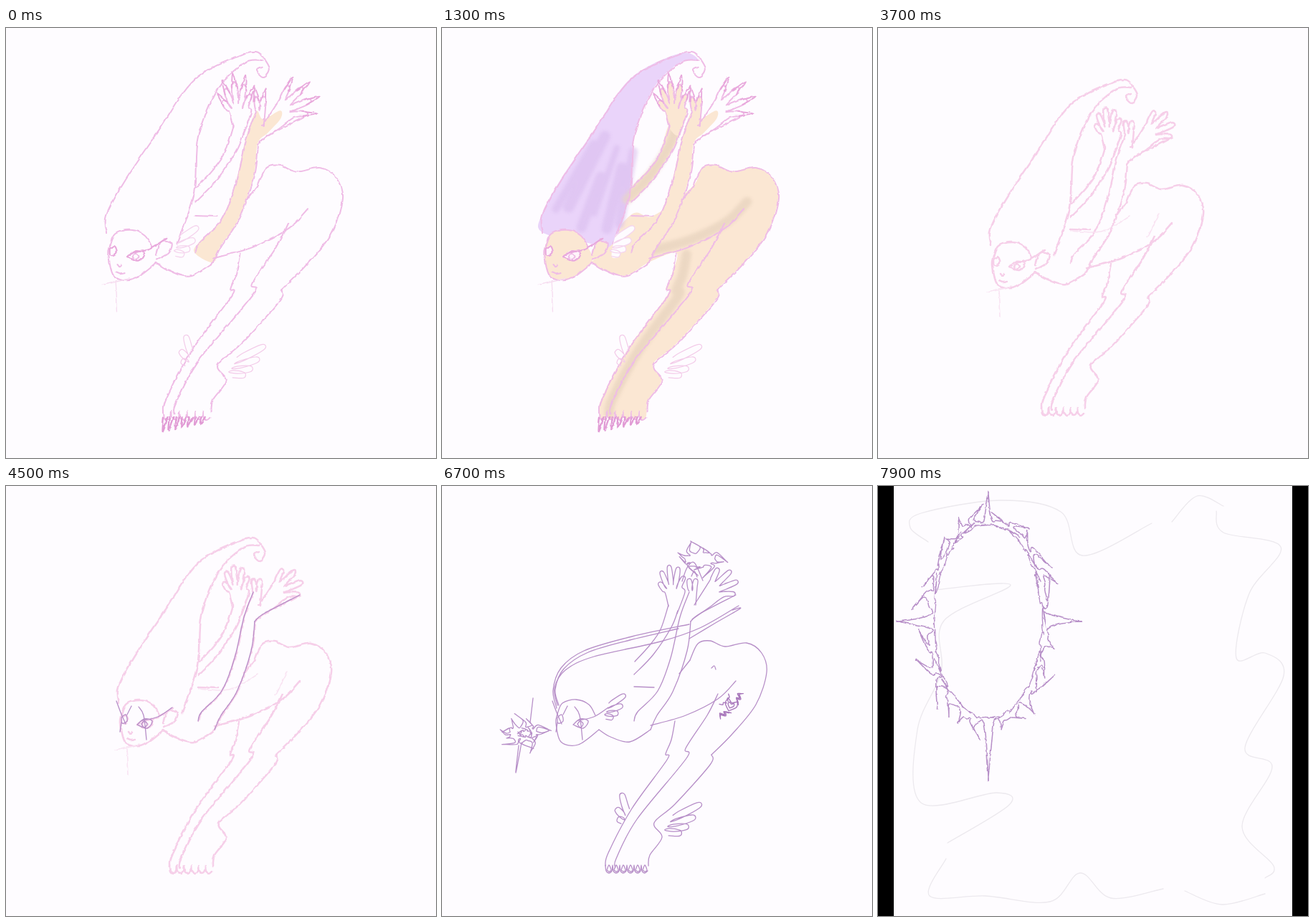
An HTML page that plays this animation: 600x600 px, repeating every 8000 ms.

```html
<!DOCTYPE html>
<html lang="en">
<head>
<meta charset="utf-8">
<title>Drawing timelapse</title>
<style>
html, body { margin: 0; width: 100%; height: 100%; overflow: hidden; background: #fefcff; }
svg { display: block; width: 100vw; height: 100vh; }
path { fill: none; stroke-linecap: round; stroke-linejoin: round; }
</style>
</head>
<body>
<svg id="stage" viewBox="0 0 600 600">
  <filter id="rough" color-interpolation-filters="sRGB">
    <feTurbulence baseFrequency=".09" numOctaves="2" seed="4"/>
    <feDisplacementMap in="SourceGraphic" scale="2" xChannelSelector="R" yChannelSelector="G"/>
  </filter>
  <filter id="soft"><feGaussianBlur stdDeviation="1.8"/></filter>
</svg>
<script>
const LOOP = 8000, STEP = 100;
const PEACH = '#fbe7d3', LILAC = '#ead4fa', PINK = '#efbce6', CYAN = '#cdf2f4', INK = '#b78fc8';
const stage = document.getElementById('stage');
const parts = [], scenes = [];

function make(tag, attrs, parent) {
  const el = document.createElementNS('http://www.w3.org/2000/svg', tag);
  for (const key in attrs) el.setAttribute(key, attrs[key]);
  return parent.appendChild(el);
}
const group = (parent, attrs = {}) => make('g', attrs, parent);
function scene(parent, from, to, attrs) {
  const el = group(parent, attrs);
  scenes.push({ el, from, to });
  return el;
}

// Smooth curve through "x,y" points.
function curve(text, closed) {
  const p = text.split(' ').map(q => q.split(',').map(Number)), n = p.length;
  const at = i => closed ? p[(i + n) % n] : p[Math.max(0, Math.min(n - 1, i))];
  let d = 'M' + p[0];
  for (let i = 0; i < (closed ? n : n - 1); i++) {
    const [a, b, c, e] = [-1, 0, 1, 2].map(k => at(i + k));
    const u = b.map((v, k) => v + (c[k] - a[k]) / 6);
    const w = c.map((v, k) => v - (e[k] - b[k]) / 6);
    d += `C${u} ${w} ${c}`;
  }
  return d;
}
const join = (...list) => list.join(' ');
const reverse = s => s.split(' ').reverse().join(' ');
const times = (n, f) => Array.from({ length: n }, (_, i) => f(i));
const random = i => Math.abs(Math.sin(i * 12.9898 + 3) * 43758.5453) % 1;
const polar = (x, y, deg, r, side = 0) => {
  const c = Math.cos(deg * Math.PI / 180), s = Math.sin(deg * Math.PI / 180);
  return `${(x + c * r - s * side).toFixed(1)},${(y + s * r + c * side).toFixed(1)}`;
};

// A line grows along its length, a fill is wiped downwards.
function line(parent, pts, stroke, width, from = -1, to = from, closed) {
  const el = make('path', { d: curve(pts, closed), stroke, 'stroke-width': width, pathLength: 1 }, parent);
  parts.push({ el, from, to });
}
function fill(parent, pts, color, from = -1, to = from) {
  const el = make('path', { d: curve(pts, true), style: 'fill:' + color }, parent);
  parts.push({ el, from, to, wipe: true });
}

// Fingers and feathers are rounded blades fanned around one point.
function fan({ x, y, n, start, step, len, width }) {
  const w = width * Math.sign(step);
  return times(n, i => {
    const a = start + i * step, l = len(i);
    const side = s => [.6, .93].map(k => polar(x, y, a, l * k, s * (1.3 - k * .5)));
    return join(polar(x, y, a - step / 2, l * .47), ...side(-w), polar(x, y, a, l), ...side(w).reverse());
  }).join(' ');
}
const claws = ({ x, y, n, start, step, len }) => times(n, i => {
  const a = start + i * step, l = len(i);
  return join(polar(x, y, a, l * .85, -3), polar(x, y, a, l + 12), polar(x, y, a, l * .85, 3));
});
const finger = mid => i => 50 * Math.cos((i - mid) * .4);
const feather = (size, shrink) => i => size * shrink ** i;
const frontFingers = { x: 368, y: 152, n: 4, start: -65, step: 21, len: finger(1.5), width: 3.8 };
const backFingers = { x: 322, y: 160, n: 5, start: -127, step: 15.5, len: finger(2.2), width: 3.6 };
const thumbFingers = { x: 349, y: 161, n: 2, start: -98, step: 18, len: () => 32, width: 3.6 };
const earWing = fan({ x: 216, y: 318, n: 4, start: -34, step: 16, len: feather(48, .79), width: 4 });
const ankleWings = [
  fan({ x: 262, y: 471, n: 3, start: -105, step: -27, len: feather(44, .65), width: 4.5 }),
  fan({ x: 290, y: 480, n: 4, start: -27, step: 11, len: feather(81, .82), width: 5 })];

// Figure
const hairLeft = '157,302 156,280 178,238 222,172 268,106 330,74';
const curl = '330,74 347,73 361,92 354,104 345,95 352,91';
const hairRight = '353,83 330,86 297,118 272,180 267,250 245,317';
const forehead = '161,318 168,303 187,298 205,305 214,320';
const face = '161,318 159,331 166,357 190,361 219,340';
const ear = '219,330 225,314 238,315 235,327 220,336';
const chest = '219,340 235,350 262,357 291,340';
const armLeft = '268,328 273,315 301,286 319,240 332,183 345,148';
const armRight = '291,340 300,320 322,287 342,230 347,189';
const forearm = '347,189 360,178 410,152';
const backArmLeft = '269,245 290,222 305,200 316,166';
const backArmRight = '268,263 295,235 320,197 329,174';
const spine = '268,280 296,281';
const waist = '331,262 346,243';
const hip = '346,243 357,220 374,216 395,224 425,219 446,233 453,260 438,305 405,346 376,375';
const shin = '376,375 374,389 325,444 296,470 307,490 290,515 288,530';
const belly = '291,334 340,320 385,297 410,272';
const legLeft = '325,328 320,354 312,374 314,382 265,450 232,512 228,530';
const legMid = '385,290 370,320 340,366 341,380 272,465 243,520 242,532';
const toes = times(6, i => [0, 1, 5, 9].map((dx, k) => `${228 + i * 10 + dx},${[529, 537, 540, 537][k]}`).join(' ')).join(' ');
const backHand = join('316,168', fan(backFingers), '339,148 328,178');
const frontHand = join('352,166', fan(frontFingers), '372,170 349,186');
const thumbs = join(fan(thumbFingers), '354,166');
const eye = '183,333 193,325 204,328 197,338 183,333';
const iris = '189,332 193,328 197,332 193,337 189,332';
const leftEye = '161,323 167,319 169,328 162,331 161,323';
const liner = '190,327 212,322 232,309';
const lips = '168,352 173,354 180,353';
const nose = '170,342 173,345 175,343';
const spikes = ['154,300 160,316 167,332', '175,307 169,319', '185,308 192,320 196,354', '161,330 159,343'];
const limbs = [frontHand, thumbs, backHand, backArmLeft, backArmRight, chest, spine, waist, hip, shin, belly, legLeft, legMid, toes];
const sketch = [hairLeft, curl, hairRight, forehead, face, ear, armLeft, armRight, forearm, ...limbs, eye, iris, leftEye, liner, lips, nose];

// Heart between mirrored waves; tilt turns the heart alone.
function emblem(parent, color, width, from, to, tilt, size) {
  const g = group(parent);
  for (const k of [1, .5]) {
    const s = size * k, right = [[0, 9], [9, 0], [7, -8], [0, -4]].map(([x, y]) => [x * s, y * s]);
    const left = right.slice(1, 3).reverse().map(([x, y]) => [-x, y]);
    line(group(g, { transform: `rotate(${tilt})` }), [...right, ...left, right[0]].join(' '), color, width, from, to);
  }
  for (const side of [1, -1]) {
    const half = group(g, { transform: `scale(${side} 1)` });
    for (let k = 0; k < 3; k++)
      line(half, times(5, j => `${11 + k * 2 + j * (6 - k)},${8 - k * 2 - j * 2 + (j % 2 ? -4 : 3)}`).join(' '), color, width, from, to);
    line(half, times(4, j => `${2 + j * 4},${-9 - j * 2 - (j % 2) * 4}`).join(' '), color, width, from, to);
  }
  return g;
}

// Ring of curling flames; reach(i) is the length of each.
function flames(cx, cy, rx, ry, n, reach, base) {
  const d = 2 * Math.PI / n;
  const at = (a, r) => `${(cx + Math.cos(a) * (rx + r)).toFixed(1)},${(cy + Math.sin(a) * (ry + r)).toFixed(1)}`;
  return times(n, i => {
    const a = i * d - Math.PI / 2, r = reach(i), bend = r > 38 ? 0 : (random(i) - .5) * 1.8 * d;
    const tip = at(a + bend, r);
    return join(at(a - .38 * d, base * random(i + 40)), at(a - .15 * d - bend * .3, r * .5), tip, tip,
      at(a + .12 * d - bend * .3, r * .4), at(a + .36 * d, base * random(i + 70)));
  }).join(' ');
}

// First scene: colouring
const first = scene(stage, 0, 3700);
const poseA = group(first, { transform: 'matrix(1.111 0 0 1.0965 -34.4 -46)' });
const paint = group(poseA);
fill(paint, join(backArmLeft, reverse(backArmRight)), PEACH, 500, 600);
fill(paint, join('219,340', spine, hip, shin, reverse(toes), reverse(legLeft), reverse(chest)), PEACH, 100, 500);
fill(paint, join(hairLeft, hairRight, '212,315'), LILAC, 600, 1000);
const shade = group(paint, { filter: 'url(#soft)', opacity: .6 });
for (let i = 0; i < 6; i++) {
  const x = 174 + i * 16, y = 265 + random(i) * 35, k = .3 + random(i + 8) * .3;
  line(shade, `${x},${y} ${x + (300 - x) * k * .8},${y + (95 - y) * k}`, '#d9bdee', 7 + random(i + 3) * 7, 1000 + i * 30, 1100 + i * 30);
}
[[backArmRight, -5, -3], [belly, 4, -9], [legLeft, 13, 2]].forEach(([s, dx, dy], i) =>
  line(group(shade, { transform: `translate(${dx} ${dy})` }), s, '#e3cfba', 12, 1100 + i * 50, 1200 + i * 50));
fill(paint, join(face, reverse(forehead)), PEACH, 100, 200);
fill(paint, ear, PEACH, 200);
fill(paint, join(armLeft, '354,158 375,147 376,157 360,175', reverse(armRight)), PEACH);
fill(paint, backHand, PEACH, 600, 700);
fill(paint, thumbs, PEACH, 600, 700);
fill(paint, frontHand, PEACH, 1500, 1700);
line(paint, curl, LILAC, 6, 1700, 1800);
const glow = group(paint, { filter: 'url(#soft)', opacity: .7 });
['288,312 318,265', '434,224 451,248', '345,380 325,405'].forEach(s => line(glow, s, '#e3efcb', 6, 2500, 2700));
[eye, leftEye].forEach(s => fill(paint, s, '#fff4fa', 200));

const wingA = group(first, { transform: 'matrix(1.17 0 0 1.2 -31 -72)' });
fill(wingA, earWing, '#fefcff', 600);
fill(wingA, earWing, CYAN, 1900, 2100);
line(wingA, earWing, '#f5d5ee', 1.1);
for (const s of ankleWings) {
  fill(first, s, CYAN, 2100, 2300);
  line(first, s, '#f3cbe9', 1.2);
}

const pinkA = group(poseA, { filter: 'url(#rough)' });
sketch.forEach(s => line(pinkA, s, PINK, 1.8));
[frontFingers, backFingers, thumbFingers].flatMap(claws).concat(liner, eye, leftEye)
  .forEach(s => line(pinkA, s, '#e8a8dc', 1.7));
times(7, i => `${228 + i * 8},537 ${227 + i * 8},${555 - i * 1.6} ${233 + i * 8},537`)
  .forEach(s => line(pinkA, s, '#e19bd5', 2.1));
const strays = ['168,365 170,402', '152,368 185,360'];
strays.forEach(s => line(pinkA, s, '#f6dcf0', 1.2));
for (const [cx, cy, rx] of [[193, 333, 5.5], [167, 327, 3]]) {
  const pupil = make('ellipse', { cx, cy, rx, ry: 5, fill: '#795a7c' }, poseA);
  const shine = make('circle', { cx: cx + 1, cy: cy - 1, r: 1.4, fill: '#fff' }, poseA);
  for (const el of [pupil, shine]) parts.push({ el, from: 2300, to: 2300, wipe: true });
}
const stamp = emblem(first, '#57435f', 1.3, 2700, 2800, 0, 1);

// Second scene: inking
const second = scene(stage, 3700, 7300);
const pinkB = scene(second, 3700, 6200, { filter: 'url(#rough)' });
sketch.forEach(s => line(pinkB, s, '#f6cfe9', 2.5));
[...strays, '268,282 310,284 350,262', '375,292 392,258'].forEach(s => line(pinkB, s, '#f9e4f3', 1.6));

const inkLine = (s, from, to, closed) => line(second, s, INK, 1.3, from, to, closed);
const inkAll = (list, from, gap) => list.forEach((s, i) => inkLine(s, from + i * gap, from + i * gap + 100));
inkAll([...spikes, eye, iris, leftEye, liner], 3900, 40);
inkAll([armLeft, armRight, forearm], 4200, 100);
inkAll([...limbs, earWing, ...ankleWings], 4500, 50);
const tattoo = emblem(second, '#a877bb', 2, 5300, 5500, 70, 1.35);
tattoo.setAttribute('transform', 'translate(403 306) rotate(-48) scale(.68)');
const guides = scene(second, 5400, 6100);
['141,345 246,319', '182,286 203,402'].forEach(s => line(guides, s, '#a986b8', 1.2, 5400, 5500));
inkAll([face, forehead, '376,254 380,251 382,256'], 5500, 100);
inkAll(times(6, i => {
  const x = 233 + i * 10;
  return `${x - 3},536 ${x},529 ${x + 3},536 ${x},538 ${x - 3},536`;
}), 5800, 40);
inkLine(flames(360, 102, 18, 8, 10, i => 6 + random(i + 5) * 15, 4), 5900, 6300, true);
inkAll(['335,133 342,114 352,107 364,132', '348,126 352,119 356,127'], 6200, 50);
inkLine(flames(113, 345, 18, 8, 12, i => 6 + random(i + 2) * 15, 3), 6300, 6600, true);
inkLine(flames(117, 345, 6, 3, 7, () => 5, 1), 6400, 6600, true);
inkAll(['127,296 123,330', '111,358 103,400 107,362'], 6500, 50);
inkAll(['160,310 155,285 166,254 198,230 265,210 345,193', '161,306 157,282 172,257 212,238 305,217 360,198 414,167',
  '163,306 158,284 170,255 204,232 262,215 330,199', '345,213 380,192 416,171 405,173'], 6300, 100);

// Third scene: frame ornament
const third = scene(stage, 7300, LOOP);
for (const x of [0, 578]) make('rect', { x, width: 22, height: 600 }, third);
['70,78 45,58 60,38 170,20 255,36 285,97 382,52',
  '410,50 445,14 482,28',
  '472,35 482,65 562,85 518,150 500,240 540,233 566,265 512,365 550,392 508,475 552,530 540,547',
  '540,569 480,584 428,565',
  '398,562 325,575 282,540 240,580 150,572 72,572 95,520',
  '97,498 183,445 165,428 60,442 55,340 88,260 92,188 185,138 80,145']
  .forEach(s => line(third, s, '#ece9ee', 1.3));
const ornament = group(third, { filter: 'url(#rough)' });
const reach = i => i % 7 ? 12 + random(i + 9) * 17 : [41, 50, 80, 48][i / 7];
line(ornament, flames(153, 188, 77, 137, 28, reach, 9), INK, 1.5, 7200, 7900, true);
line(ornament, flames(153, 188, 74, 134, 30, i => random(i) * 7, 2), INK, 1.3, 7200, 7900, true);

function draw(t) {
  for (const s of scenes) s.el.style.display = t >= s.from && t < s.to ? '' : 'none';
  for (const { el, from, to, wipe } of parts) {
    const p = t >= to ? 1 : Math.max(0, (t - from) / (to - from));
    el.style.visibility = p > 0 ? '' : 'hidden';
    if (wipe) el.style.clipPath = p < 1 ? `inset(0 0 ${100 - p * 100}% 0)` : 'none';
    else el.style.strokeDasharray = p < 1 ? `${p} 2` : 'none';
  }
  const k = Math.max(0, Math.min(1, (t - 3100) / 300));
  stamp.setAttribute('transform', `translate(${300 + 113 * k} ${382 - 93 * k}) rotate(${-48 * k}) scale(${1 - .3 * k})`);
}

let shown = -1;
function tick(now) {
  const t = Math.floor(now % LOOP / STEP) * STEP;
  if (t !== shown) draw(shown = t);
  requestAnimationFrame(tick);
}
draw(0);
requestAnimationFrame(tick);
</script>
</body>
</html>
```
